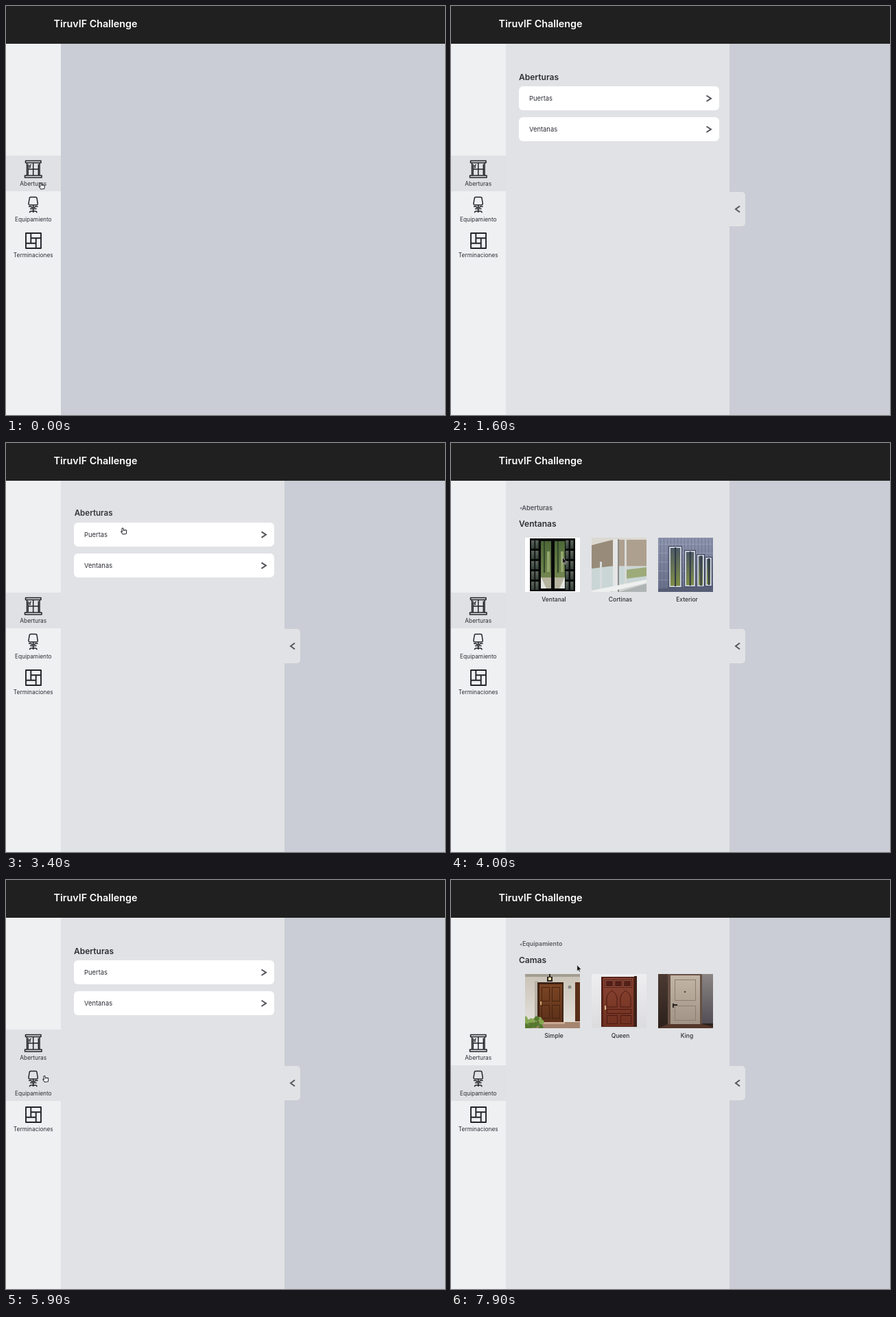
An HTML page with a canvas for the animation above (8000 ms loop, 640 px wide and 596 px high).

```html
<!DOCTYPE html>
<html lang="es">
<head>
<meta charset="utf-8">
<title>TiruvIF Challenge</title>
<style>
html, body { margin: 0; width: 100%; height: 100%; overflow: hidden; background: #cacdd5; }
body { position: relative; font-family: Inter, Roboto, sans-serif; color: #2c2e35; }
div, canvas, svg { position: absolute; }
div { white-space: nowrap; }
header { position: absolute; inset: 0 0 auto 0; height: 55px; background: #202020; }
header div { left: 69.5px; top: 16px; font: 600 14.35px/20px Inter, Roboto, sans-serif; color: #fff; }
#side { left: 0; top: 55px; width: 79.5px; bottom: 0; background: #eff0f2; }
.item { left: 0; width: 79.5px; height: 52px; }
.item.on { background: #e0e1e4; }
.item div { left: 0; right: 0; top: 31px; text-align: center; font-size: 8.35px; line-height: 20px; }
.item svg { left: 0; top: 0; fill: none; stroke: #222328; stroke-linejoin: round; }
#clip { left: 79.5px; top: 55px; right: 0; bottom: 0; overflow: hidden; }
#sheet { left: -79.5px; top: -55px; width: 640px; height: 596px; }
#back { left: 0; top: 55px; width: 405.5px; bottom: 0; background: #e1e2e5; }
#tab { left: 405px; top: 271px; width: 23.5px; height: 50px; background: #e1e2e5; border-radius: 0 5px 5px 0; }
.chev { fill: none; stroke: #55575d; stroke-width: 2; }
.row { left: 99px; width: 292px; height: 35px; border-radius: 6px; background: #fff; }
.row div { left: 15px; top: 0; font-size: 9.4px; line-height: 35px; }
.row svg { left: 272px; top: 12px; }
#head, #name { font-weight: 600; font-size: 12px; line-height: 20px; transform-origin: 0 50%; }
#head { left: 0; top: -10px; }
#name { left: 99px; top: 106.5px; }
#mark { left: 100px; top: 91.5px; }
.pic { top: 137px; width: 80px; }
.pic div { left: 2px; width: 80px; top: 80px; text-align: center; font-size: 8.5px; font-weight: 500; line-height: 20px; }
#cur { left: 0; top: 0; overflow: visible; }
</style>
</head>
<body>
<header><div>TiruvIF Challenge</div></header>
<div id="side"></div>
<div class="item" style="top:218px">
  <svg width="80" height="52" stroke-width="1.5">
    <path d="M28.5 7.5h22.5v3h-22.5zM30.5 10.5h18.5v18.5h-18.5zM27.5 29h24.5v3h-24.5z"/>
    <path d="M32.2 12.5v16M47.3 12.5v16M39.7 11v18M32 19.8h15.5M33.5 16l3-3M34 18l2-2"/>
  </svg><div>Aberturas</div>
</div>
<div class="item" style="top:270px">
  <svg width="80" height="52" stroke-width="1.5">
    <path d="M36 8.5h7.2q1.5 0 1.8 1.5l1.2 7.5q.3 2.5-2 2.5h-9.2q-2.300 0-2-2.500l1.200-7.500q.3-1.500 1.800-1.500z"/>
    <path d="M33 22.200h3.500l1 1.300h4.200l1-1.300h3.800M35 25.500h9.500M39.700 20v3M39.700 26v5M34.500 31.200q0-2.200 2.500-2.200h5.500q2.500 0 2.500 2.200"/>
  </svg><div>Equipamiento</div>
</div>
<div class="item" style="top:322px">
  <svg width="80" height="52" stroke-width="1.9">
    <path d="M29 9h22v22h-22zM36.300 9v14.700M36.300 16.300h14.700M43.700 16.300v14.700M29 23.700h14.700"/>
  </svg><div>Terminaciones</div>
</div>
<div id="clip"><div id="sheet">
  <div id="back"></div>
  <div id="tab"><svg class="chev" style="left:8px;top:19px" width="10" height="12"><path d="M8 1.500L2 6l6 4.500"/></svg></div>
  <div id="list"></div>
  <div id="detail">
    <svg id="mark" width="4" height="4"><path d="M3 .2v3.600L.2 2z" fill="#777a82"/></svg>
    <div id="name"></div>
  </div>
  <div id="head"></div>
</div></div>
<svg id="cur" width="1" height="1">
  <path id="hand" transform="rotate(-8) translate(-4.600 -5.500)" fill="#fff" stroke="#25262b" stroke-width="1" stroke-linejoin="round"
    d="M3 .8c-.7 0-1 .4-1 1v4.200l-.7-.7c-.6-.5-1.300 0-.9.8l2 3.600h5l.8-3V4.900c0-.9-1.200-.9-1.200-.2 0-.9-1.300-.9-1.400-.2-.1-.8-1.300-.7-1.400 0V1.800c0-.6-.3-1-1.200-1z"/>
  <path id="arrow" transform="translate(-2.700 -5)" fill="#111" stroke="#fff" stroke-width=".5"
    d="M0 0v9l2-2 1.400 3 1.300-.6-1.300-2.900h2.800z"/>
</svg>
<script>
const LOOP = 8000, TICK = 100, MORPH = 480;
const $ = id => document.getElementById(id);
const clamp = v => Math.max(0, Math.min(1, v));
const mix = (a, b, k) => a + (b - a) * k;
const easeOut = p => 1 - (1 - p) * (1 - p);

// Picture helpers: every thumbnail is 80 by 79.
function painter(canvas) {
  const c = canvas.getContext('2d');
  const box = (col, x, y, w, h) => { c.fillStyle = col; c.fillRect(x, y, w, h); };
  const fade = (x, y, w, h, top, bottom) => {
    const g = c.createLinearGradient(0, y, 0, y + h);
    g.addColorStop(0, top);
    g.addColorStop(1, bottom);
    box(g, x, y, w, h);
  };
  const frame = (col, x, y, w, h) => { c.strokeStyle = col; c.strokeRect(x + .5, y + .5, w, h); };
  const poly = (col, ...p) => {
    c.fillStyle = col;
    c.beginPath();
    for (let i = 0; i < p.length; i += 2) c.lineTo(p[i], p[i + 1]);
    c.fill();
  };
  const dot = (col, x, y, r) => { c.fillStyle = col; c.beginPath(); c.arc(x, y, r, 0, 7); c.fill(); };
  return { c, box, fade, frame, poly, dot };
}

const art = {
  doors: [
    ({ box, fade, frame, dot }) => {
      fade(0, 0, 80, 79, '#c9c2b6', '#e6e3de');
      box('#a39c90', 0, 0, 80, 4);
      box('#b8b1a6', 14, 10, 5, 60);
      box('#3f2415', 18, 12, 38, 58);
      fade(21, 15, 33, 55, '#7c4524', '#5c3019');
      for (const x of [24, 39]) { frame('#472411', x, 19, 11, 20); frame('#472411', x, 45, 11, 19); }
      box('#c4a66b', 22, 40, 2, 5);
      box('#5a2d18', 73, 12, 7, 57);
      box('#a5856f', 0, 70, 80, 9);
      box('#caa994', 20, 70, 38, 3);
      box('#27231f', 35, 0, 2, 4);
      box('#27231f', 32, 4, 8, 7);
      box('#e8d9a8', 34, 5, 4, 4);
      dot('#8b8b8b', 65, 19, 2.500);
      for (let i = 0; i < 16; i++) dot(i % 3 ? '#55792f' : '#86a652', (i * 7) % 27, 65 + (i * 5) % 14, 3.500);
    },
    ({ c, box, fade, frame }) => {
      fade(0, 0, 80, 79, '#eeeef0', '#dcdcdf');
      box('#3d2019', 62, 3, 4, 74);
      box('#55231a', 14, 4, 48, 73);
      fade(17, 6, 44, 70, '#8a4433', '#70301f');
      box('#522018', 19, 8, 40, 12);
      for (const x of [20, 33, 46]) frame('#9a5543', x, 9, 11, 9);
      for (const x of [22, 42]) {
        c.strokeStyle = '#4b1a13';
        c.beginPath();
        c.moveTo(x, 48);
        c.lineTo(x, 34);
        c.quadraticCurveTo(x + 1, 28, x + 7.500, 24);
        c.quadraticCurveTo(x + 14, 28, x + 15, 34);
        c.lineTo(x + 15, 48);
        c.closePath();
        c.stroke();
        frame('#4b1a13', x, 60, 15, 12);
      }
      frame('#4b1a13', 22, 51, 35, 6);
      box('#d2b58b', 19, 46, 2, 6);
    },
    ({ box, fade, frame, dot, poly }) => {
      fade(0, 0, 80, 79, '#4b3a32', '#2c201c');
      fade(64, 0, 16, 72, '#8b8583', '#514e55');
      box('#665044', 14, 0, 50, 74);
      fade(18, 2, 43, 71, '#c2b5a6', '#a19385');
      frame('#8c7d70', 24, 8, 30, 30);
      frame('#8c7d70', 24, 46, 30, 21);
      dot('#4b4039', 39, 26, 1.200);
      box('#2a2320', 21, 44, 7, 2);
      box('#2a2320', 21, 43, 2, 6);
      poly('#54372a', 0, 79, 14, 73, 64, 73, 80, 77, 80, 79);
    }
  ],
  windows: [
    ({ box, fade, poly }) => {
      box('#fff', 0, 0, 80, 79);
      box('#080909', 7, 1, 66, 77);
      for (const x of [9, 15, 59, 66])
        for (let y = 4; y < 70; y += 15) fade(x, y, 4.500, 12, '#5d665c', '#35423a');
      for (const x of [23, 43]) {
        fade(x, 5, 15, 69, '#4c6737', '#7f9058');
        box('#34482a', x + 4, 5, 2, 46);
        box('#93a56d', x + 9, 20, 4, 30);
        box('#b6b49f', x, 58, 15, 16);
      }
      poly('#e2e5df', 23, 74, 23, 57, 31, 74);
      poly('#e2e5df', 58, 74, 58, 57, 50, 74);
      box('#080909', 39, 2, 3, 75);
    },
    ({ box, fade, poly }) => {
      fade(0, 0, 80, 79, '#c4bcae', '#d2d5d4');
      poly('#c9d6d5', 0, 42, 80, 42, 80, 65, 0, 76);
      poly('#9dab7a', 48, 47, 80, 43, 80, 56, 48, 60);
      poly('#988b79', 0, 10, 32, 3, 32, 41, 0, 45);
      poly('#ada08e', 38, 3, 80, 0, 80, 41, 38, 41);
      poly('#dcd9d2', 0, 0, 80, 0, 80, 3, 30, 3, 0, 11);
      box('#e4e5e4', 31, 2, 7, 77);
      box('#8b8c89', 38, 2, 2, 77);
      box('#d9dad8', 48, 2, 3, 70);
      box('#d8dcdd', 12, 35, 3, 44);
      poly('#eef0ef', 0, 77, 80, 61, 80, 66, 25, 79, 0, 79);
      poly('#aeb4b3', 40, 79, 80, 67, 80, 79);
    },
    ({ c, box, fade, poly }) => {
      fade(0, 0, 80, 79, '#8c93ad', '#666e88');
      c.globalAlpha = .35;
      for (let x = 3; x < 80; x += 5) box('#4f566f', x, 0, 1, 79);
      for (let y = 9; y < 79; y += 13) box('#b5bbcd', 0, y, 80, 1);
      c.globalAlpha = 1;
      for (const [x, y, w, h] of [[16, 13, 18, 59], [39, 19, 15, 52], [57, 25, 10, 46], [69, 29, 9, 41]]) {
        box('#3c4258', x - 1, y - 1, w + 2, h + 2);
        box('#c4cad6', x, y, w, h);
        fade(x + 2, y + 2, w - 4, h - 4, '#4c5965', '#7f8d45');
        box('#303847', x + w * .45, y + 1, 2, h - 2);
      }
      poly('#565d75', 0, 74, 80, 70, 80, 79, 0, 79);
    }
  ]
};

const menus = [['Aberturas', 'Puertas', 'Ventanas'], ['Equipamiento', 'Camas', 'Sillones']];
const doors = ['Simple', 'Doble', 'Interior'];
const steps = [
  { at: 0, menu: 0 },
  { at: 1600, menu: 0, open: 'Puertas', set: 'doors', labels: doors },
  { at: 3100, menu: 0 },
  { at: 3700, menu: 0, open: 'Ventanas', set: 'windows', labels: ['Ventanal', 'Cortinas', 'Exterior'] },
  { at: 4900, menu: 0 },
  { at: 6000, menu: 1 },
  { at: 7300, menu: 1, open: 'Camas', set: 'doors', labels: ['Simple', 'Queen', 'King'] }
];

// Pointer path: time, x, y
const path = [
  [0, 52.500, 262.500], [300, 52.500, 262.500], [1100, 150, 150], [1500, 172, 136],
  [2100, 160, 150], [2400, 92, 232], [2600, 58, 246], [3000, 120, 100], [3200, 120, 100],
  [3400, 172, 128.500], [3700, 168, 176], [3900, 168, 176], [4600, 120, 100], [5000, 120, 100],
  [5700, 60, 292], [5900, 58, 290], [6100, 58, 290], [6700, 192, 154], [6900, 192, 154],
  [7200, 203, 143], [7400, 203, 143], [7800, 186.500, 129], [LOOP, 186.500, 129]
];
const within = (t, spans) => spans.some(([a, b]) => t >= a && t < b);
const hidden = [[1600, 2100]];
const arrows = [[2100, 2900], [4000, 4500], [5200, 5500], [7500, LOOP]];

function add(parent, cls, html, style) {
  const el = document.createElement('div');
  el.className = cls;
  el.innerHTML = html;
  Object.assign(el.style, style);
  parent.append(el);
  return el;
}

const rows = [117, 162].map(y => add($('list'), 'row',
  '<div></div><svg class="chev" width="10" height="12"><path d="M1.500 1.500L8 5.700 1.500 10"/></svg>',
  { top: y + 'px' }));
const pics = [108, 205, 302].map(x => {
  const el = add($('detail'), 'pic', '<div></div>', { left: x + 'px' });
  const sets = {};
  for (const set in art) {
    sets[set] = document.createElement('canvas');
    sets[set].width = 80;
    sets[set].height = 79;
    el.append(sets[set]);
  }
  return { label: el.firstChild, sets };
});
pics.forEach(({ sets }, i) => {
  for (const set in sets) art[set][i](painter(sets[set]));
});
const items = [...document.querySelectorAll('.item')];

function setText(el, s) { if (el.textContent !== s) el.textContent = s; }

function pointer(t) {
  const i = path.findIndex(k => k[0] > t);
  const [a, b] = [path[i - 1], path[i]];
  const p = (t - a[0]) / (b[0] - a[0]), k = p * p * (3 - 2 * p);
  return [mix(a[1], b[1], k), mix(a[2], b[2], k)];
}

function render(t) {
  const n = steps.filter(s => s.at <= t).length - 1;
  const now = steps[n], prev = steps[n - 1] || now;
  const p = clamp((t - now.at) / MORPH), e = easeOut(p);
  const depth = now.open ? e : prev.open ? 1 - e : 0;
  const swap = now.menu !== prev.menu ? .4 + .6 * e : 1;
  const page = now.open ? now : prev;
  const [title, ...names] = menus[now.menu];

  const slide = easeOut(clamp((t - 200) / 900));
  $('sheet').style.transform = `translateX(${mix(-350, 0, slide)}px)`;

  setText($('head'), title);
  $('head').style.transform =
    `translate(${mix(99, 104, depth)}px,${mix(104, 93.500, depth)}px) scale(${mix(1, .733, depth)})`;
  $('head').style.color = `rgb(${mix(44, 88, depth)},${mix(46, 90, depth)},${mix(53, 99, depth)})`;

  rows.forEach((r, i) => setText(r.firstChild, names[i]));
  $('list').style.opacity = clamp((.7 - depth) * 2) * swap;
  $('list').style.transform = `translateY(${-8 * depth}px)`;

  $('detail').style.opacity = clamp((depth - .3) * 2);
  $('detail').style.transform = `translateY(${7 * (1 - depth)}px)`;
  if (page.open) {
    setText($('name'), page.open);
    pics.forEach((pic, i) => {
      setText(pic.label, page.labels[i]);
      for (const set in pic.sets) pic.sets[set].style.display = set === page.set ? 'block' : 'none';
    });
  }

  const [x, y] = pointer(t);
  const shown = !within(t, hidden), arrow = within(t, arrows);
  $('cur').style.transform = `translate(${x}px,${y}px)`;
  $('hand').style.display = shown && !arrow ? '' : 'none';
  $('arrow').style.display = shown && arrow ? '' : 'none';
  items.forEach((el, i) => {
    const top = 218 + 52 * i;
    const hover = shown && x < 79 && y >= top && y < top + 52;
    el.classList.toggle('on', hover || (t >= 300 && now.menu === i));
  });
}

const start = performance.now();
function loop() {
  const t = (performance.now() - start) % LOOP;
  render(Math.floor(t / TICK) * TICK);
  requestAnimationFrame(loop);
}
render(0);
requestAnimationFrame(loop);
</script>
</body>
</html>
```
